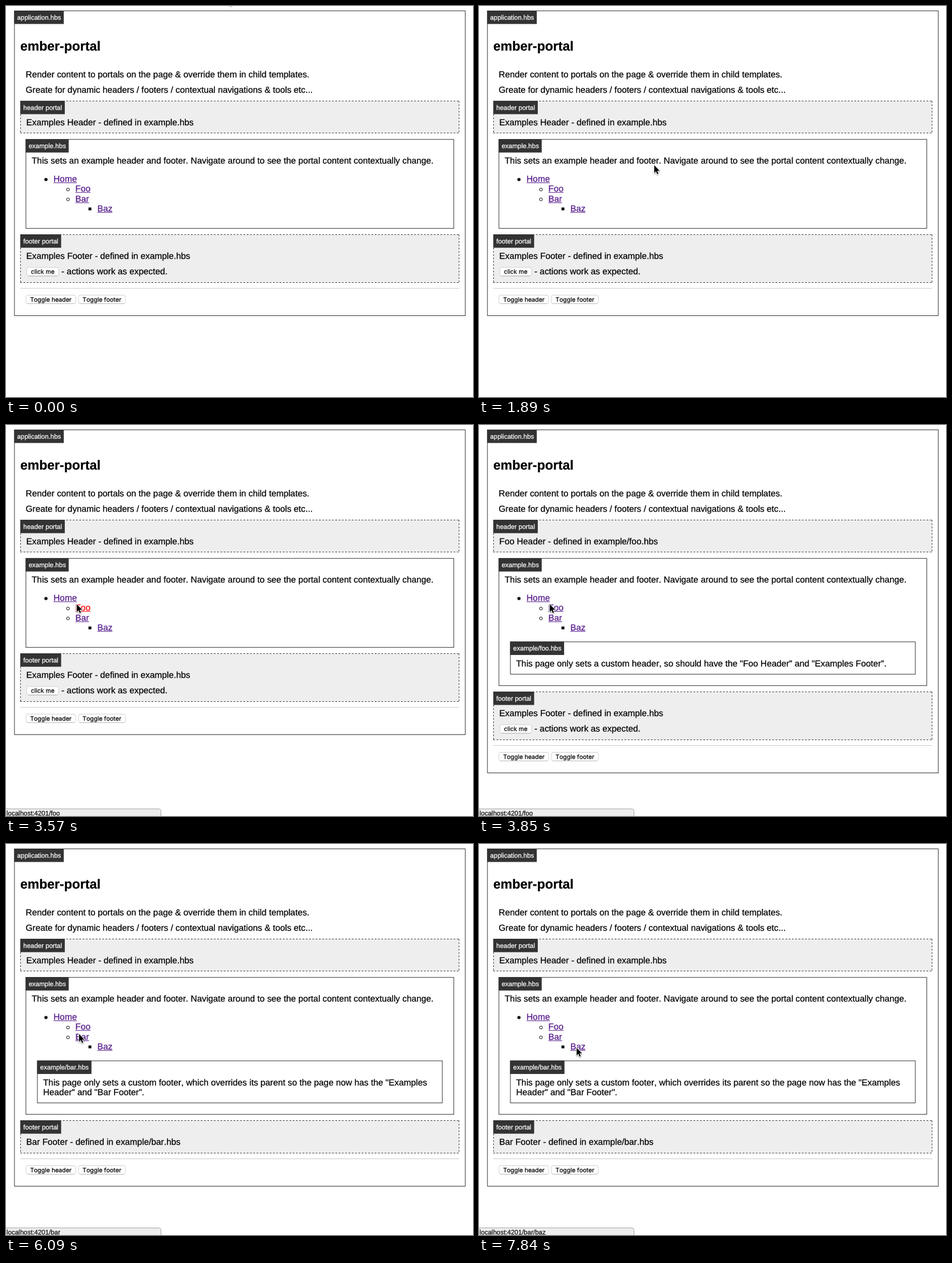
These frames come from a looping animation (818x685 px, 8 s). An HTML page with a canvas:

```html
<!DOCTYPE html>
<html lang="en">
<head>
<meta charset="utf-8">
<title>ember-portal</title>
<style>
  html, body { margin: 0; width: 100%; height: 100%; overflow: hidden; background: #fff; }
  canvas { display: block; width: 818px; height: 685px; }
</style>
</head>
<body>
<canvas id="stage"></canvas>
<script>
const W = 818, H = 685, LOOP = 8000, STEP = 70;
const SANS = '"Liberation Sans", Arial, sans-serif';
const BODY = '15.34px ' + SANS;
const SMALL = '11.5px ' + SANS;
const TITLE = 'bold 23px ' + SANS;
const BUTTON = '10.54px Inter, sans-serif';
const DARK = '#333', LINK = '#551a8b', HOVER = '#f00';

const canvas = document.getElementById('stage');
const ratio = window.devicePixelRatio || 1;
canvas.width = W * ratio;
canvas.height = H * ratio;
const ctx = canvas.getContext('2d');

const pages = {
  home: {
    header: 'Examples Header - defined in example.hbs',
    footer: 'Examples Footer - defined in example.hbs',
    action: true, lines: []
  },
  foo: {
    header: 'Foo Header - defined in example/foo.hbs',
    footer: 'Examples Footer - defined in example.hbs',
    action: true, label: 'example/foo.hbs',
    lines: ['This page only sets a custom header, so should have the "Foo Header" and "Examples Footer".']
  },
  bar: {
    header: 'Examples Header - defined in example.hbs',
    footer: 'Bar Footer - defined in example/bar.hbs',
    action: false, label: 'example/bar.hbs',
    lines: [
      'This page only sets a custom footer, which overrides its parent so the page now has the "Examples',
      'Header" and "Bar Footer".'
    ]
  }
};

const links = [['Home', 83.3, 308], ['Foo', 121.6, 325], ['Bar', 121.6, 343], ['Baz', 160, 360]];

// Each entry: start time, page, hovered link, status path (null = no status bar)
const states = [
  [0, 'home', '', null],
  [2520, 'home', 'Home', ''],
  [2940, 'home', 'Foo', '/foo'],
  [3850, 'foo', '', '/foo'],
  [4970, 'foo', 'Foo', '/foo'],
  [5180, 'foo', 'Bar', '/bar'],
  [6090, 'bar', '', '/bar'],
  [6860, 'bar', 'Bar', '/bar'],
  [7000, 'bar', '', '/bar'],
  [7630, 'bar', '', null],
  [7700, 'bar', '', '/bar/baz']
];

const linear = p => p;
const easeOut = p => 1 - (1 - p) ** 2;
const easeInOut = p => p * p * (3 - 2 * p);

// Cursor path: time, x, y, easing towards this point
const path = [
  [0, 388, -16, linear],
  [560, 388, -16, linear],
  [1330, 326, 267, easeInOut],
  [1820, 326, 267, linear],
  [1890, 307, 279, linear],
  [2660, 116, 303, easeOut],
  [3080, 124, 314, easeInOut],
  [4900, 124, 314, linear],
  [5390, 128, 333, easeInOut],
  [6790, 128, 333, linear],
  [7140, 161, 370, easeInOut],
  [7490, 172, 368, easeInOut],
  [7840, 171, 357, easeInOut],
  [LOOP, 171, 357, linear]
];

function cursorAt(t) {
  const i = path.findIndex(k => k[0] > t);
  const [t0, x0, y0] = path[i - 1];
  const [t1, x1, y1, ease] = path[i];
  const p = ease((t - t0) / (t1 - t0));
  return [x0 + (x1 - x0) * p, y0 + (y1 - y0) * p];
}

const ramp = (t, from, to) => Math.min(1, Math.max(0, (t - from) / (to - from)));

function statusAlpha(t) {
  if (t < 3000) return ramp(t, 2450, 2590);
  return t < 7700 ? 1 - ramp(t, 7350, 7630) : ramp(t, 7630, 7840);
}

// A hairline stroke gives the slightly heavy look of smoothed screen text
function text(str, x, y, font = BODY, color = '#000') {
  ctx.font = font;
  ctx.fillStyle = ctx.strokeStyle = color;
  ctx.lineWidth = 0.25;
  ctx.fillText(str, x, y);
  ctx.strokeText(str, x, y);
}

function line(x0, y0, x1, y1) {
  ctx.beginPath();
  ctx.moveTo(x0, y0);
  ctx.lineTo(x1, y1);
  ctx.stroke();
}

function tag(str, x, y) {
  ctx.font = SMALL;
  ctx.fillStyle = DARK;
  ctx.fillRect(x, y, ctx.measureText(str).width + 10.2, 23.5);
  text(str, x + 5.3, y + 15.8, SMALL, '#fff');
}

function frame(label, x, y, right, bottom) {
  ctx.strokeStyle = DARK;
  ctx.lineWidth = 1;
  ctx.strokeRect(x, y, right - x, bottom - y);
  tag(label, x - 0.5, y - 0.5);
}

function portal(label, y, bottom) {
  const left = 25, right = 794;
  ctx.fillStyle = '#eee';
  ctx.fillRect(left, y - 0.5, right - left, bottom - y + 1);
  ctx.strokeStyle = DARK;
  ctx.lineWidth = 1;
  ctx.setLineDash([2.875, 2.875]);
  line(left, y, right, y);
  line(left, bottom, right, bottom);
  line(left + 0.5, y, left + 0.5, bottom);
  line(right - 0.5, y, right - 0.5, bottom);
  ctx.setLineDash([]);
  tag(label, left, y - 0.5);
}

function button(str, x, y, w) {
  ctx.beginPath();
  ctx.roundRect(x + 0.5, y + 0.5, w - 1, 15, 3);
  ctx.fillStyle = '#fff';
  ctx.fill();
  ctx.strokeStyle = '#d0d0d0';
  ctx.lineWidth = 1;
  ctx.stroke();
  ctx.strokeStyle = '#b8b8b8';
  line(x + 3, y + 15.5, x + w - 3, y + 15.5);
  ctx.textAlign = 'center';
  text(str, x + w / 2, y + 11.9, BUTTON);
  ctx.textAlign = 'left';
}

function bullet(x, y, r, hollow) {
  ctx.beginPath();
  ctx.arc(x, y, r, 0, Math.PI * 2);
  ctx.fillStyle = ctx.strokeStyle = '#000';
  ctx.lineWidth = 1;
  if (hollow) ctx.stroke(); else ctx.fill();
}

function nav(hover) {
  bullet(70, 304, 2.8);
  bullet(108.5, 321.5, 2.5, true);
  bullet(108.5, 338.8, 2.5, true);
  ctx.fillRect(144.5, 353, 5, 5);
  for (const [name, x, y] of links) {
    text(name, x, y, BODY, name === hover ? HOVER : LINK);
    ctx.fillRect(x, y + 1.2, ctx.measureText(name).width, 1);
  }
}

function status(route, alpha) {
  ctx.globalAlpha = alpha;
  ctx.beginPath();
  ctx.roundRect(-5, 672.5, 276.5, 20, [0, 4, 0, 0]);
  ctx.fillStyle = '#ededed';
  ctx.fill();
  ctx.strokeStyle = '#a8a8a8';
  ctx.lineWidth = 1;
  ctx.stroke();
  text('localhost:4201' + route, 1, 684, SMALL, '#111');
  ctx.globalAlpha = 1;
}

const arrow = new Path2D('M0 0V13.4L3 10.6L5.2 15.6L7.3 14.7L5.1 9.8H9.4Z');

function cursor(x, y) {
  ctx.save();
  ctx.translate(x, y);
  ctx.lineJoin = 'round';
  ctx.lineWidth = 1.8;
  ctx.strokeStyle = '#fff';
  ctx.shadowColor = 'rgba(0,0,0,.45)';
  ctx.shadowBlur = 2.5 * ratio;
  ctx.shadowOffsetY = ratio;
  ctx.stroke(arrow);
  ctx.shadowColor = 'transparent';
  ctx.fillStyle = '#000';
  ctx.fill(arrow);
  ctx.restore();
}

function drawPage(page, hover) {
  const count = page.lines.length;
  const extra = count ? 50 + 17 * count : 0;
  const foot = 400 + extra;
  const footEnd = foot + (page.action ? 84 : 57);
  const rule = footEnd + 10;

  frame('application.hbs', 14.8, 8.5, 804.4, rule + 48.5);
  text('ember-portal', 25, 78, TITLE);
  text('Render content to portals on the page & override them in child templates.', 34.6, 125);
  text('Greate for dynamic headers / footers / contextual navigations & tools etc...', 34.6, 152);

  portal('header portal', 166.5, 222.5);
  text(page.header, 35.6, 209);

  frame('example.hbs', 34.9, 233.7, 784.3, 389.6 + extra);
  text('This sets an example header and footer. Navigate around to see the portal content contextually change.', 45, 276);
  nav(hover);
  if (count) {
    frame(page.label, 55, 379.9, 764.2, 419.6 + 17 * count);
    page.lines.forEach((str, i) => text(str, 65, 423 + 17 * i));
  }

  portal('footer portal', foot + 0.5, footEnd + 0.5);
  text(page.footer, 35.6, foot + 43);
  if (page.action) {
    button('click me', 36, foot + 57.5, 56.5);
    text('- actions work as expected.', 97, foot + 70);
  }

  ctx.fillStyle = '#ccc';
  ctx.fillRect(25, rule, 769, 1);
  button('Toggle header', 34.5, rule + 12, 88);
  button('Toggle footer', 126.5, rule + 12, 83);
}

function draw(now) {
  const t = Math.floor((now % LOOP) / STEP) * STEP;
  const [, name, hover, route] = states.findLast(s => s[0] <= t);
  ctx.setTransform(ratio, 0, 0, ratio, 0, 0);
  ctx.textRendering = 'geometricPrecision';
  ctx.fontKerning = 'none';
  ctx.lineJoin = 'miter';
  ctx.fillStyle = '#fff';
  ctx.fillRect(0, 0, W, H);
  drawPage(pages[name], hover);
  if (route !== null) status(route, statusAlpha(t));
  cursor(...cursorAt(t));
}

let start;
function tick(now) {
  start ??= now;
  draw(now - start);
  requestAnimationFrame(tick);
}
draw(0);
requestAnimationFrame(tick);
</script>
</body>
</html>
```
